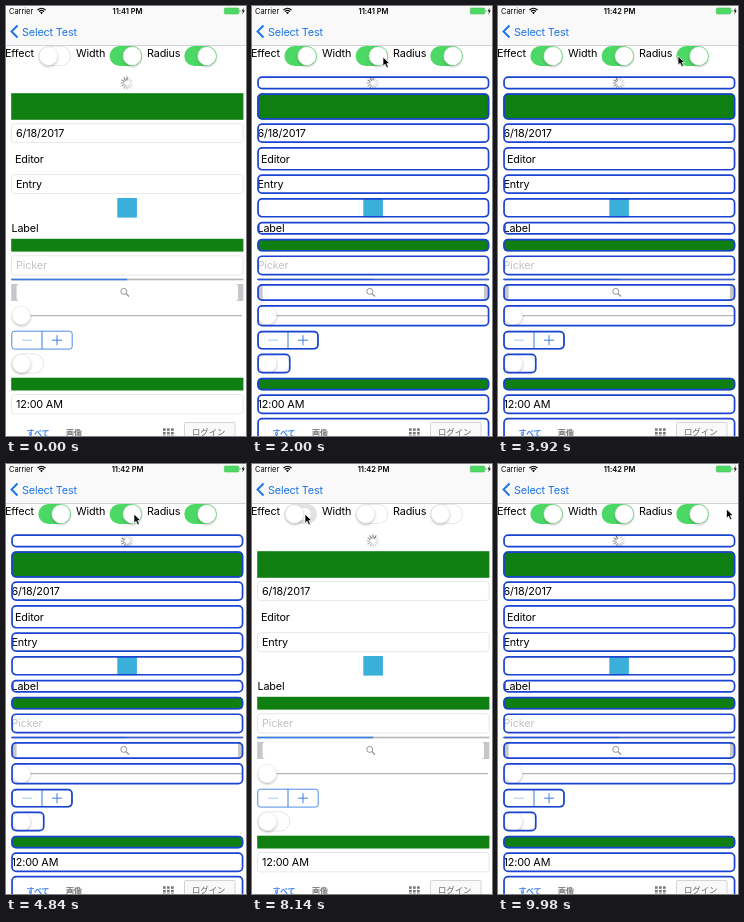
Recreate the animation shown at these times as an HTML page. Size 240 by 430 pixels, loop 10000 ms.

```html
<!DOCTYPE html>
<html lang="en">
<head>
<meta charset="utf-8">
<title>View effects</title>
<style>
html, body { margin: 0; width: 100%; height: 100%; overflow: hidden; background: #fff; }
svg { display: block; width: 240px; height: 430px; }
text { font: 10.8px Inter, "Liberation Sans", sans-serif; letter-spacing: -.15px; white-space: pre; }
.bar { font-size: 7.5px; letter-spacing: -.05px; }
.jp { font-family: "Noto Sans CJK JP", "Noto Sans CJK", sans-serif; letter-spacing: 0; }
</style>
</head>
<body>
<svg id="stage" viewBox="0 0 240 430"></svg>
<script>
const NS = "http://www.w3.org/2000/svg";
const LOOP = 10000, GREEN = "#0f7f12", BLUE = "#3a7fe0", EDGE = "#1b43d2";
const stage = document.getElementById("stage");

function add(parent, tag, attrs = {}, content) {
  const el = document.createElementNS(NS, tag);
  set(el, attrs);
  if (content !== undefined) el.textContent = content;
  parent.appendChild(el);
  return el;
}
function set(el, attrs) {
  for (const k in attrs) el.setAttribute(k, attrs[k]);
}
const clamp = v => Math.max(0, Math.min(1, v));
const ease = v => { v = clamp(v); return v * v * (3 - 2 * v); };
const rect = (p, x, y, width, height, more) => add(p, "rect", { x, y, width, height, ...more });
const label = (p, x, y, s, more) => add(p, "text", { x, y, ...more }, s);
const path = (p, d, more) => add(p, "path", { d, fill: "none", ...more });

const defs = add(stage, "defs");
const soft = add(defs, "filter", { id: "soft", x: "-50%", y: "-50%", width: "200%", height: "200%" });
add(soft, "feDropShadow", { dx: 0, dy: 1.3, stdDeviation: 1.1, "flood-color": "#000", "flood-opacity": .27 });

function thumb(p, cx, cy) {
  return add(p, "circle", { cx, cy, r: 9.2, fill: "#fff", stroke: "#d9d9d9", "stroke-width": .4, filter: "url(#soft)" });
}

function makeSwitch(p, x, cy) {
  const base = rect(p, x, cy - 10, 32.6, 20, { rx: 10 });
  const hole = rect(p, 0, 0, 0, 0, { fill: "#fff" });
  const knob = thumb(p, x + 10, cy);
  return (on, age) => {
    const move = ease(age / 230), k = on ? move : 1 - move;
    const mix = (a, b) => Math.round(a + (b - a) * k);
    const open = on ? 0 : ease((age - 120) / 280);
    const w = 31 * open, h = 18.4 * open;
    base.setAttribute("fill", `rgb(${mix(226, 76)},${mix(226, 216)},${mix(229, 100)})`);
    set(hole, { x: x + 16.3 - w / 2, y: cy - h / 2, width: w, height: h, rx: h / 2 });
    knob.setAttribute("cx", x + 10 + 12.6 * k);
  };
}

// Status and navigation bars
rect(stage, 0, 0, 240, 430, { fill: "#fff" });
rect(stage, 0, 0, 240, 39.4, { fill: "#f9f9f9" });
rect(stage, 0, 39.2, 240, .6, { fill: "#b8b8bb" });
label(stage, 3, 7.6, "Carrier", { class: "bar" });
const clock = label(stage, 121.5, 7.6, "", { class: "bar", "text-anchor": "middle", "font-weight": 600, style: "font-weight:600" });
path(stage, "M31.5 4Q35.5 .5 39.5 4M33 5.5Q35.5 3.3 38 5.5", { stroke: "#000", "stroke-width": 1.1 });
path(stage, "M34 6.6Q35.5 5.5 37 6.6L35.5 8.2Z", { fill: "#000" });
rect(stage, 218.3, 2, 14.5, 6, { rx: 1, fill: "#4cd964", stroke: "#4cc25f", "stroke-width": .6 });
rect(stage, 233.5, 4, .9, 2, { fill: "#4cc25f" });
path(stage, "M237.8 1.8L235.6 5.3H237L236.3 8.2L238.8 4.5H237.3Z", { fill: "#000" });
path(stage, "M11.5 19.5L5.5 25.5L11.5 31.5", { stroke: "#1a73e8", "stroke-width": 1.9 });
label(stage, 16, 29.5, "Select Test", { fill: "#1a73e8" });

const toggles = [["Effect", -1, 32.4], ["Width", 70, 103.6], ["Radius", 141, 178.3]].map(([name, x, sx]) => {
  label(stage, x, 50.6, name);
  return makeSwitch(stage, sx, 50);
});

// Each box can gain an outline and rounded clipping
const boxes = [];
function box(y, h, draw, x = 5.2, w = 232.2) {
  const id = "clip" + boxes.length;
  const clip = rect(add(defs, "clipPath", { id }), x, y, w, h);
  const g = add(stage, "g");
  draw(g);
  const r = Math.min(h / 2, 5);
  const t = Math.min(1.7, h / 2);
  const edge = rect(stage, x + t / 2, y + t / 2, w - t, h - t, { fill: "none", stroke: EDGE, "stroke-width": t });
  boxes.push((effect, width, round) => {
    const rr = round ? r : 0;
    clip.setAttribute("rx", rr);
    edge.setAttribute("rx", Math.max(0, rr - t / 2));
    edge.setAttribute("visibility", effect && width ? "visible" : "hidden");
    if (effect && round) g.setAttribute("clip-path", `url(#${id})`);
    else g.removeAttribute("clip-path");
  });
}
const solid = (y, h) => box(y, h, g => rect(g, 5.2, y, 232.2, h, { fill: GREEN }));

const fields = [];
function field(y, h, s, fill = "#000") {
  box(y, h, g => {
    const frame = rect(g, 5.5, y + .3, 231.6, h - .6, { rx: 3, fill: "#fff", stroke: "#dedede", "stroke-width": .7 });
    const txt = label(g, 10, y + h / 2 + 3.9, s, { fill });
    fields.push(effect => {
      frame.setAttribute("visibility", effect ? "hidden" : "visible");
      txt.setAttribute("x", effect ? 5.5 : 10);
    });
  });
}

const spokes = [];
box(70.2, 13.3, g => {
  for (let i = 0; i < 12; i++)
    spokes.push(path(g, "M0 -3.1V-5.9", {
      stroke: "#777", "stroke-width": 1.2, "stroke-linecap": "round",
      transform: `translate(121 77) rotate(${i * 30})`
    }));
});
solid(87.2, 26.6);
field(117.3, 19.6, "6/18/2017");
box(141, 23.6, g => label(g, 9, 157, "Editor"));
field(168.3, 19.6, "Entry");
box(192, 19.6, g => rect(g, 111.3, 192, 19.6, 19.6, { fill: "#3aafda" }));
box(215.8, 13, g => label(g, 5.5, 226, "Label"));
solid(232.8, 12.8);
field(249.4, 20, "Picker", "#c3c3c8");
box(272.7, 1.6, g => {
  rect(g, 5.2, 272.7, 232.2, 1.6, { fill: "#b5b5b5" });
  rect(g, 5.2, 272.7, 116, 1.6, { fill: BLUE });
});
box(278, 17, g => {
  rect(g, 5.2, 278, 232.2, 17, { fill: "#c7c7ca" });
  rect(g, 10.6, 278, 221.4, 17, { rx: 3, fill: "#fff" });
  add(g, "circle", { cx: 117.8, cy: 285.4, r: 3, fill: "none", stroke: "#8a8a8d", "stroke-width": .9 });
  path(g, "M120 287.6L123 290.5", { stroke: "#8a8a8d", "stroke-width": 1.1 });
});
box(299, 21.5, g => {
  rect(g, 14, 308.9, 222, 1.3, { rx: .6, fill: "#b5b5b5" });
  thumb(g, 15.3, 309.5);
});
box(324.8, 18.8, g => {
  rect(g, 5.8, 325.2, 60.4, 17.9, { rx: 2.6, fill: "#fff", stroke: BLUE, "stroke-width": .9 });
  path(g, "M36 325V343M46 334.2H56M51 329.2V339.2", { stroke: BLUE, "stroke-width": 1 });
  path(g, "M16 334.2H26", { stroke: "#a9c9f3", "stroke-width": 1 });
}, 5.2, 61.6);
box(347.5, 20, g => makeSwitch(g, 5.5, 357.5)(false, 9999), 5.2, 33.4);
solid(371.7, 12.8);
field(388.2, 20, "12:00 AM");
box(411.8, 60, g => {
  label(g, 20.5, 430.2, "すべて", { class: "jp", fill: "#4285f4", style: "font-size:8px;font-weight:700" });
  label(g, 60, 430.2, "画像", { class: "jp", fill: "#777", style: "font-size:8px;font-weight:700" });
  for (let i = 0; i < 9; i++)
    rect(g, 157 + i % 3 * 4, 422.3 + Math.floor(i / 3) * 3.6, 2.7, 2.5, { fill: "#777" });
  rect(g, 178.5, 416.5, 50.5, 19, { rx: 1, fill: "#f9f9f9", stroke: "#cbcbcb", "stroke-width": .8 });
  label(g, 186, 429.4, "ログイン", { class: "jp", fill: "#666", style: "font-size:8.4px" });
});

const pointer = path(stage, "M0 0V9.2L2.1 7.2L3.7 10.7L5.4 9.9L3.8 6.6H6.7Z", {
  fill: "#000", stroke: "#fff", "stroke-width": .7, "stroke-linejoin": "round"
});

// Initial state and flip times of Effect, Width, Radius
const flips = [
  [false, 750, 7850, 8250],
  [true, 5200, 8900],
  [true, 2950, 3500, 6620, 9450]
];
function stateAt([start, ...times], t) {
  const past = times.filter(v => v <= t);
  return { on: past.length % 2 ? !start : start, age: past.length ? t - past[past.length - 1] : 9999 };
}

// Pointer stops: time, x, y
const route = [
  [0, -9, 60], [600, 53, 51], [1150, 53, 51], [1700, 131, 51], [2050, 131, 51],
  [2700, 196.5, 50], [3650, 196.5, 50], [4500, 128, 50], [5350, 128, 50],
  [6200, 195, 51], [6900, 195, 51], [7600, 53, 50], [8320, 53, 50], [8750, 124, 50],
  [8980, 124, 50], [9330, 197, 50], [9550, 197, 50], [9950, 228.5, 45], [LOOP, 228.5, 45]
];
function pointerAt(t) {
  const i = route.findIndex(p => p[0] > t);
  const [t0, x0, y0] = route[i - 1], [t1, x1, y1] = route[i];
  const k = ease((t - t0) / (t1 - t0));
  return [x0 + (x1 - x0) * k, y0 + (y1 - y0) * k];
}

function render(t) {
  const states = flips.map(f => stateAt(f, t));
  states.forEach((s, i) => toggles[i](s.on, s.age));
  const [effect, width, round] = states.map(s => s.on);
  boxes.forEach(f => f(effect, width, round));
  fields.forEach(f => f(effect));
  clock.textContent = t < 3600 ? "11:41 PM" : "11:42 PM";
  const head = Math.floor(t / 1000 * 12) % 12;
  spokes.forEach((s, i) => s.setAttribute("opacity", Math.max(.25, 1 - (head - i + 12) % 12 * .09)));
  pointer.setAttribute("transform", `translate(${pointerAt(t)})`);
}

const begin = performance.now();
function tick() {
  render((performance.now() - begin) % LOOP);
  requestAnimationFrame(tick);
}
tick();
</script>
</body>
</html>
```
